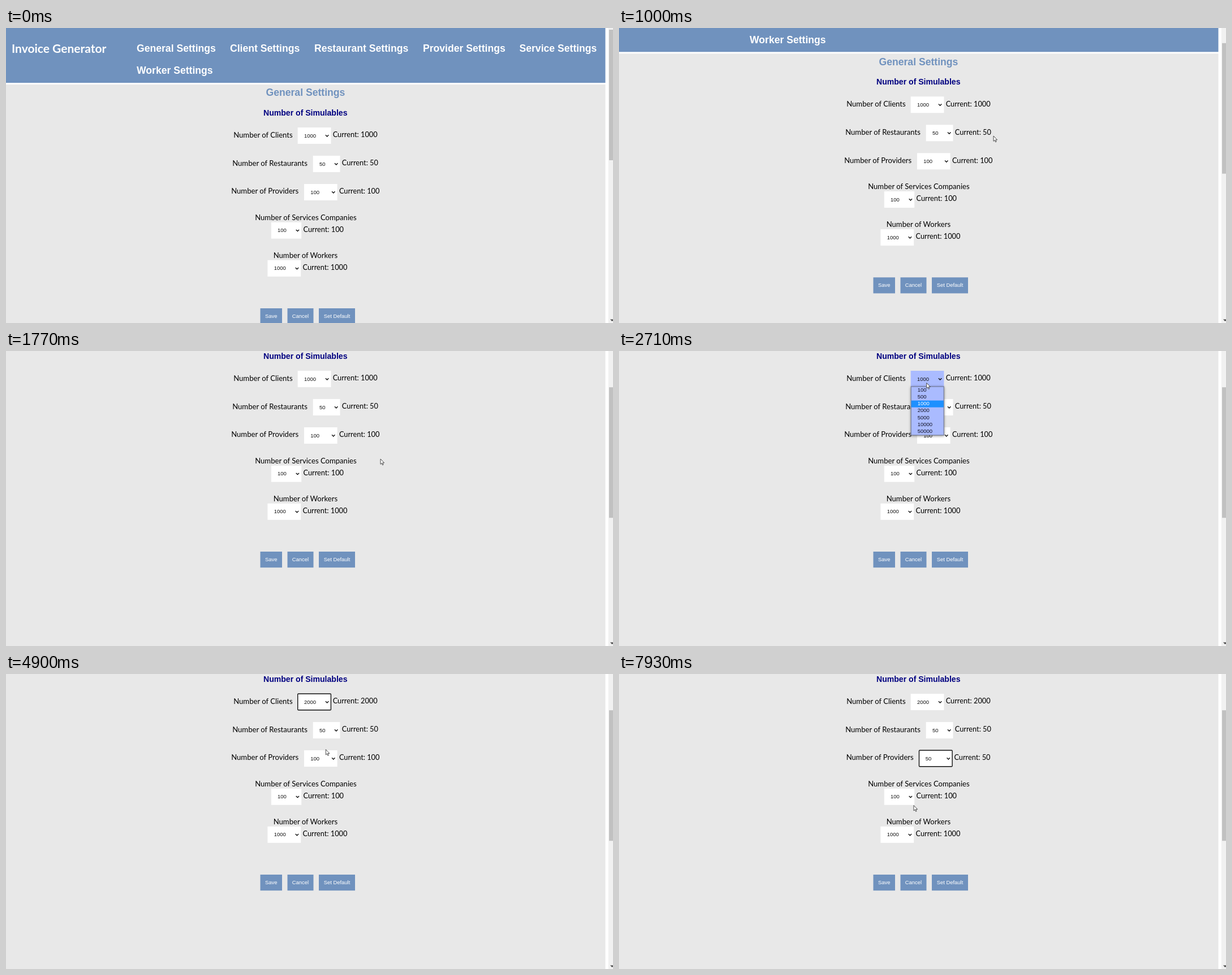
These frames come from a looping animation (1073 px wide and 522 px high, 8000 ms). An HTML page:

```html
<!DOCTYPE html>
<html lang="en">
<head>
<meta charset="utf-8">
<title>Settings page</title>
<style>
html, body { margin: 0; width: 100%; height: 100%; overflow: hidden; background: #fff; }
svg { display: block; width: 1073px; height: 522px; }
text { white-space: pre; }
.heading { font: bold 17.6px "Liberation Sans", Arial, sans-serif; }
.sub { font: bold 14.07px "Liberation Sans", Arial, sans-serif; }
.brand { font: bold 21px Lato, sans-serif; }
.label { font: 13.1px Lato, sans-serif; }
.current { font: 12.75px Lato, sans-serif; }
.control { font: 9.45px "Liberation Sans", Arial, sans-serif; }
</style>
</head>
<body>
<svg id="stage" viewBox="0 0 1073 522"></svg>
<script>
const NS = "http://www.w3.org/2000/svg";
const LOOP = 8000, BLUE = "#7092be", HOVER = "#aabbff";
const stage = document.getElementById("stage");

function add(parent, tag, attrs, content) {
  const el = document.createElementNS(NS, tag);
  set(el, attrs);
  if (content !== undefined) el.textContent = content;
  return parent.appendChild(el);
}
function set(el, attrs) {
  for (const key in attrs) el.setAttribute(key, attrs[key]);
}
const show = (el, on) => set(el, { visibility: on ? "visible" : "hidden" });
const rect = (parent, x, y, width, height, fill) =>
  add(parent, "rect", { x, y, width, height, fill });
const text = (parent, cls, x, y, fill, content) =>
  add(parent, "text", { class: cls, x, y, fill }, content);

rect(stage, 0, 0, 1073, 522, "#fff");
const page = add(stage, "g", {});
rect(page, 0, 0, 1059.5, 97, BLUE);
rect(page, 0, 100, 1059.5, 700, "#e8e8e8");
text(page, "brand", 10, 44, "#fff", "Invoice Generator");
[["General", 231, 41.7], ["Client", 396, 41.7], ["Restaurant", 545, 41.7],
 ["Provider", 737, 41.7], ["Service", 907.5, 41.7], ["Worker", 231, 81.3]]
  .forEach(([name, x, y]) => text(page, "heading", x, y, "#fff", name + " Settings"));
text(page, "heading", 459.5, 120.4, BLUE, "General Settings");
text(page, "sub", 455, 155, "#000080", "Number of Simulables");

function makeRow(name, labelX, labelY, boxX, boxY, width, value) {
  const g = add(page, "g", {});
  text(g, "label", labelX, labelY, "#000", "Number of " + name);
  const box = rect(g, boxX, boxY, width, 29, "#fff");
  const chosen = text(g, "control", boxX + 11.3, boxY + 17.6, "#111", value);
  const tipX = boxX + width - 6.8;
  add(g, "path", {
    d: `M${tipX - 2.7} ${boxY + 13.2}l2.7 2.7 2.7-2.7`,
    fill: "none", stroke: "#111", "stroke-width": 1.4
  });
  const outline = add(g, "rect", {
    x: boxX, y: boxY, width, height: 28.8, rx: 1.2,
    fill: "none", stroke: "#101010", "stroke-width": 1.4
  });
  const current = text(g, "current", boxX + width + 3.3, boxY + 17.4, "#000", "");
  return { g, box, chosen, outline, current, x: boxX, y: boxY, width };
}
const clients = makeRow("Clients", 402.2, 193.5, 515.7, 176, 58.7, 1000);
const restaurants = makeRow("Restaurants", 400.2, 243.7, 542.7, 226, 47.8, 50);
const providers = makeRow("Providers", 398.2, 293.3, 527, 276, 58.6, 100);
const services = makeRow("Services Companies", 440.2, 339.6, 468.8, 343.7, 53.4, 100);
const workers = makeRow("Workers", 472.7, 406.7, 462.4, 410.8, 58.8, 1000);

[["Save", 449.5, 38.5], ["Cancel", 497.5, 46], ["Set Default", 553, 64]]
  .forEach(([name, x, width]) => {
    rect(page, x, 496, width, 28.2, BLUE);
    set(text(page, "control", x + width / 2, 513.2, "#fff", name), { "text-anchor": "middle" });
  });

rect(stage, 1064.8, 0, 9, 522, "#f1f1f1");
const thumb = rect(stage, 1066, 3, 7, 231, "#c1c1c1");
add(stage, "path", { d: "M1068 515.5h5v2.2l-1.8 1.2z", fill: "#505050" });

const PITCH = 12.05;
function makeMenu(x, y, width, values) {
  const g = add(stage, "g", {});
  const panel = rect(g, x, y, width, values.length * PITCH + 1.6, HOVER);
  set(panel, { stroke: "#6d7388", style: "filter:drop-shadow(0 1px 2px rgba(0,0,0,.45))" });
  const mark = rect(g, x + .4, y + .5, width - .8, PITCH, "#1e90ff");
  const items = values.map((v, i) =>
    text(g, "control", x + 11.5, y + 9.3 + i * PITCH, "#101020", v));
  return { g, mark, items, y };
}
const clientMenu = makeMenu(516.2, 63, 58, [100, 500, 1000, 2000, 5000, 10000, 50000]);
const providerMenu = makeMenu(527.5, 163, 58, [50, 100, 500, 1000, 2500, 5000, 10000]);

const cursor = add(stage, "path", {
  d: "M0 0v9.4l2.1-2 1.5 3.4 1.5-.7-1.5-3.2h3z",
  fill: "#fff", stroke: "#222", "stroke-width": .8
});

// Each move: start, end, number of steps, target.
const moves = [
  [70, 450, 6, 662, 191],
  [2150, 2470, 5, 543, 52],
  [2640, 3410, 11, 551, 104],
  [3490, 3490, 1, 550.3, 106],
  [4270, 4270, 1, 542, 99.3],
  [4670, 4900, 4, 565.3, 133.6],
  [4980, 5200, 4, 562, 151],
  [5520, 6210, 10, 546, 167],
  [6380, 6380, 1, 545.3, 165.7],
  [7160, 7930, 11, 521, 232.5]
];
const smooth = p => p * p * (3 - 2 * p);

// Share of a stepped move already made; the first step moves at once.
function progress(t, start, end, steps) {
  if (t < start) return 0;
  if (t >= end) return 1;
  const k = Math.floor((t - start) / (end - start) * (steps - 1) + .08);
  return (k + 1) / steps;
}
function cursorAt(t) {
  let x = 955, y = 485;
  for (const [start, end, steps, toX, toY] of moves) {
    if (t < start) break;
    const p = smooth(progress(t, start, end, steps));
    x += (toX - x) * p;
    y += (toY - y) * p;
  }
  return [x, y];
}
// One wheel notch settles in three steps.
function scrollAt(t) {
  const notch = (start, middle, end) =>
    t < start ? 0 : t < middle ? 22 : t < end ? 54.7 : 70.5;
  return notch(910, 990, 1075) + notch(1620, 1690, 1760);
}
function paintRow(row, value, focused, hovered) {
  row.chosen.textContent = value;
  row.current.textContent = "Current: " + value;
  show(row.outline, focused);
  set(row.box, { fill: hovered ? HOVER : "#fff" });
}
function paintMenu(menu, open, y, selected) {
  set(menu.g, { display: open ? "inline" : "none" });
  const index = y < menu.y ? selected : Math.floor((y - menu.y) / PITCH);
  set(menu.mark, { y: menu.y + .5 + index * PITCH });
  menu.items.forEach((item, i) => set(item, { fill: i === index ? "#fff" : "#101020" }));
}

function render(t) {
  const scroll = scrollAt(t);
  const [x, y] = cursorAt(t);
  const clientOpen = t >= 2640 && t < 4420;
  const providerOpen = t >= 5520 && t < 7160;
  const open = clientOpen || providerOpen;
  const over = row => !open && x >= row.x && x <= row.x + row.width &&
    y >= row.y - scroll && y <= row.y + 29 - scroll;

  set(page, { transform: `translate(0 ${-scroll})` });
  set(thumb, { y: 3 + scroll * .434 });
  paintRow(clients, t < 4420 ? 1000 : 2000, t >= 4420 && t < 5520, clientOpen || over(clients));
  paintRow(restaurants, 50, false, over(restaurants));
  paintRow(providers, t < 7160 ? 100 : 50, t >= 7160, providerOpen || over(providers));
  paintRow(services, 100, false, over(services));
  paintRow(workers, 1000, false, over(workers));
  set(providers.g, { transform: `translate(${t < 7160 ? 0 : 3.5} 0)` });
  paintMenu(clientMenu, clientOpen, y, 2);
  paintMenu(providerMenu, providerOpen, y, 1);
  show(cursor, t >= 70);
  set(cursor, { transform: `translate(${x} ${y})` });
}

const began = performance.now();
function frame() {
  render((performance.now() - began) % LOOP);
  requestAnimationFrame(frame);
}
render(0);
requestAnimationFrame(frame);
</script>
</body>
</html>
```
